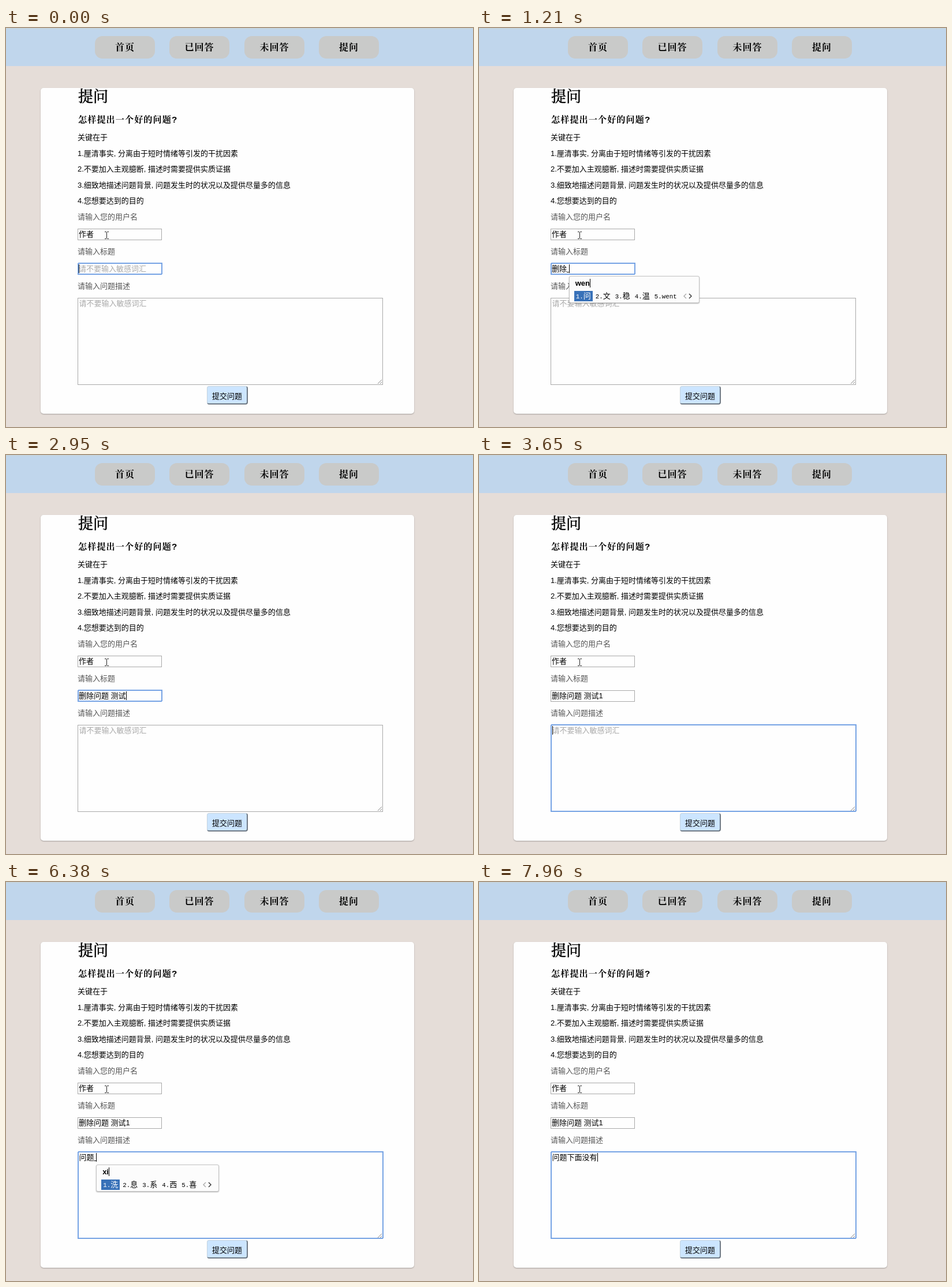
These frames come from a looping animation (809x692 px, 8 s). An HTML page:

```html
<!DOCTYPE html>
<html lang="zh-CN">
<head>
<meta charset="utf-8">
<style>
  html, body { margin: 0; width: 100%; height: 100%; overflow: hidden; background: #e5ddd8; }
  body { position: relative; color: #000; font: 13px/20px "Liberation Sans", "Noto Sans CJK SC", "Noto Sans CJK", sans-serif; }
  div, p { position: absolute; margin: 0; box-sizing: border-box; white-space: pre; }
  nav { position: absolute; left: 0; top: 0; width: 100%; height: 66px; background: #c0d6ec; border-top: 2px solid #c5d5e0; box-sizing: border-box; }
  nav div { top: 12px; width: 104px; height: 39px; border-radius: 13px; background: #c9cac9; text-align: center; line-height: 40px; }
  .serif { font-family: "Liberation Sans", "Noto Serif CJK SC", "Noto Sans CJK SC", "Noto Sans CJK", serif; }
  nav div, h3 { font-size: 16px; font-weight: bold; letter-spacing: 1px; }
  #card { left: 60px; top: 104px; width: 647px; height: 565px; border-radius: 5px; background: #fefefe; box-shadow: 0 1px 2px #a39e9b; }
  h1, h3 { position: absolute; margin: 0; left: 125px; white-space: pre; }
  h1 { top: 104px; font-size: 26px; line-height: 30px; font-weight: 500; -webkit-text-stroke: .6px; }
  h3 { top: 149px; font-size: 15.2px; line-height: 20px; }
  .label { color: #555; }
  .box { left: 124px; width: 146px; height: 20px; border: 1px solid #a9a9a9; background: #fefefe; }
  .box.focus { border-color: #76a3e4; box-shadow: 1px -1px #76a3e4, inset 1px -1px #76a3e4; }
  #bodyBox { top: 468px; width: 529px; height: 151px; }
  #bodyBox svg { position: absolute; right: 1px; bottom: 1px; }
  .field { display: flex; align-items: center; height: 15px; line-height: 15px; }
  #title { left: 126px; top: 410px; z-index: 2; }
  #body { left: 126.5px; top: 470px; z-index: 1; }
  .hint { color: #a9a9a9; }
  .mark { text-decoration: underline; }
  .caret { position: relative; flex: none; width: 1px; height: 15px; margin-right: -1px; background: #000; font-style: normal; }
  .caret.off { background: none; }
  .pop { left: 0; top: 20px; width: max-content; height: 47px; padding-left: 11px; border: 1px solid #c3c3c3; border-radius: 3px; background: #fcfcfc; box-shadow: 0 1px 2px rgba(0, 0, 0, .3); }
  .pinyin { left: 10px; top: 4px; display: flex; height: 15px; line-height: 15px; font-weight: bold; }
  .row { position: static; display: flex; margin-top: 25px; height: 18px; line-height: 18px; }
  .row span { flex: none; margin-right: 8px; }
  .row svg { flex: none; }
  .row b { font: 10.83px/18px "Liberation Mono", monospace; }
  .row span:first-child { margin: 0 5px 0 -3px; padding: 0 3px; background: #3871b8; color: #fff; }
  #send { left: 348px; top: 621px; width: 71px; height: 32px; border: solid; border-width: 1px 2px 2px 1px; border-color: #c3d3e0 #6f7a85 #6f7a85 #c3d3e0; border-radius: 4px; background: #cce5ff; text-align: center; line-height: 33px; }
  #mouse { position: absolute; left: 170px; top: 352px; }
</style>
</head>
<body>
<nav class="serif"></nav>
<div id="card"></div>
<h1 class="serif">提问</h1>
<h3 class="serif">怎样提出一个好的问题?</h3>
<div class="box" style="top:348px"></div>
<div class="box" id="titleBox" style="top:408px"></div>
<div class="box" id="bodyBox"><svg width="8" height="8" stroke="#888" fill="none"><path d="M1 8 8 1M5 8 8 5"/></svg></div>
<div class="field" id="title"></div>
<div class="field" id="body"></div>
<div id="send">提交问题</div>
<svg id="mouse" width="9" height="15" stroke="#222" fill="none"><path d="M1 1.5h2.5l1 1 1-1H8M4.5 2v11M1 13.5h2.5l1-1 1 1H8"/></svg>
<script>
const LOOP = 8000, SWITCH = 3650, TITLE = '删除问题 测试1';
const HINT = '<span class="hint">请不要输入敏感词汇</span>';
const $ = id => document.getElementById(id);

['首页', '已回答', '未回答', '提问'].forEach((name, i) => {
  document.querySelector('nav').insertAdjacentHTML('beforeend',
    `<div style="left:${Math.round(153.7 + i * 129.4)}px">${name}</div>`);
});

function line(text, x, mid, cls = '') {
  const p = document.createElement('p');
  p.textContent = text;
  p.className = cls;
  p.style.cssText = `left:${x}px;top:${mid - 10}px`;
  document.body.insertBefore(p, $('title'));
}
['关键在于',
 '1.厘清事实, 分离由于短时情绪等引发的干扰因素',
 '2.不要加入主观臆断, 描述时需要提供实质证据',
 '3.细致地描述问题背景, 问题发生时的状况以及提供尽量多的信息',
 '4.您想要达到的目的'].forEach((s, i) => line(s, 124, 190 + i * 27.5));
line('请输入您的用户名', 124, 328, 'label');
line('请输入标题', 124, 388, 'label');
line('请输入问题描述', 124, 448, 'label');
line('作者', 126, 358);

// time, committed text, pinyin, candidates, caret hidden
const steps = [
  [0, ''],
  [270, '', 's', '是 说 上 使 事'],
  [390, '', 'sh', '是 上 说 使 时'],
  [510, '', 'shan', '删 山 闪 善于 shang'],
  [660, '', "shan'c", '删除 山村 山茶 闪存 山川'],
  [810, '', "shan'chu", '删除 山处 闪出 山楚 善处'],
  [940, '删除'],
  [1090, '删除', 'w', '我 为 无 未 问'],
  [1210, '删除', 'wen', '问 文 稳 温 went'],
  [1330, '删除', "wen't", '问题 稳妥 问他 问她 问题是'],
  [1480, '删除', "wen'ti", '问题 文体 问体 文题 问题是'],
  [1600, '删除问题'],
  [2030, '删除问题 '],
  [2310, '删除问题 ', ''],
  [2430, '删除问题 ', 'c', '从 才 查 出 吃'],
  [2550, '删除问题 ', 'ce', '测 册 侧 策 厕'],
  [2670, '删除问题 ', "ce's", '测试 厕所 测速 测算 ces'],
  [2820, '删除问题 ', "ce'shi", '测试 侧视 侧室 策士 ceshi'],
  [2950, '删除问题 测试'],
  [3250, TITLE],
  [SWITCH, ''],
  [4150, '', , , true],
  [4680, ''],
  [4830, '', 'wen', '问 文 稳 温 went'],
  [4950, '', "wen't", '问题 稳妥 问他 问她 went'],
  [5100, '', "wen'ti", '问题 文体 问体 文题 问题是'],
  [5250, '', "wen'ti", '问题 文体 问体 文题 问题是', true],
  [5710, '问题'],
  [6140, '问题', ''],
  [6260, '问题', 'x', '想 下 新 小 行'],
  [6380, '问题', 'xi', '洗 息 系 西 喜'],
  [6500, '问题', 'xia', '下 吓 夏 瞎 虾'],
  [6650, '问题', "xia'm", '下面 下马 夏末 下门 虾米'],
  [6810, '问题下面'],
  [7270, '问题下面', , , true],
  [7420, '问题下面', 'm', '没 吗 么 们 每'],
  [7540, '问题下面', 'mei', '没 每 美 没有 mei'],
  [7690, '问题下面', "mei'y", '没有 每月 美元 煤油 美语'],
  [7810, '问题下面', "mei'you", '没有 没 每 美 妹', true],
  [7960, '问题下面没有']
];

function popup(pinyin, words) {
  const row = words.split(' ').map((w, i) =>
    `<span>${`${i + 1}.${w}`.replace(/[\x21-\x7e]+/g, '<b>$&</b>')}</span>`).join('');
  return `<div class="pop"><div class="pinyin">${pinyin}<i class="caret"></i></div>` +
    `<div class="row">${row}<svg width="30" height="18" fill="none" stroke-width="1.4">` +
    '<path d="M8 5 4 9l4 4" stroke="#aaa"/><path d="M13 5l4 4-4 4" stroke="#333"/></svg></div></div>';
}

function active([, text, pinyin, words, off]) {
  const composing = pinyin !== undefined;
  return `<span>${text}</span>${composing ? '<span class="mark"> </span>' : ''}` +
    `<i class="caret${off ? ' off' : ''}">${pinyin ? popup(pinyin, words) : ''}</i>` +
    (text || composing ? '' : HINT);
}

let shown;
function draw() {
  const t = performance.now() % LOOP;
  const step = steps.findLast(s => s[0] <= t);
  if (step !== shown) {
    shown = step;
    const inBody = step[0] >= SWITCH;
    $('title').innerHTML = inBody ? TITLE : active(step);
    $('body').innerHTML = inBody ? active(step) : HINT;
    $('titleBox').classList.toggle('focus', !inBody);
    $('bodyBox').classList.toggle('focus', inBody);
  }
  requestAnimationFrame(draw);
}
draw();
</script>
</body>
</html>
```
